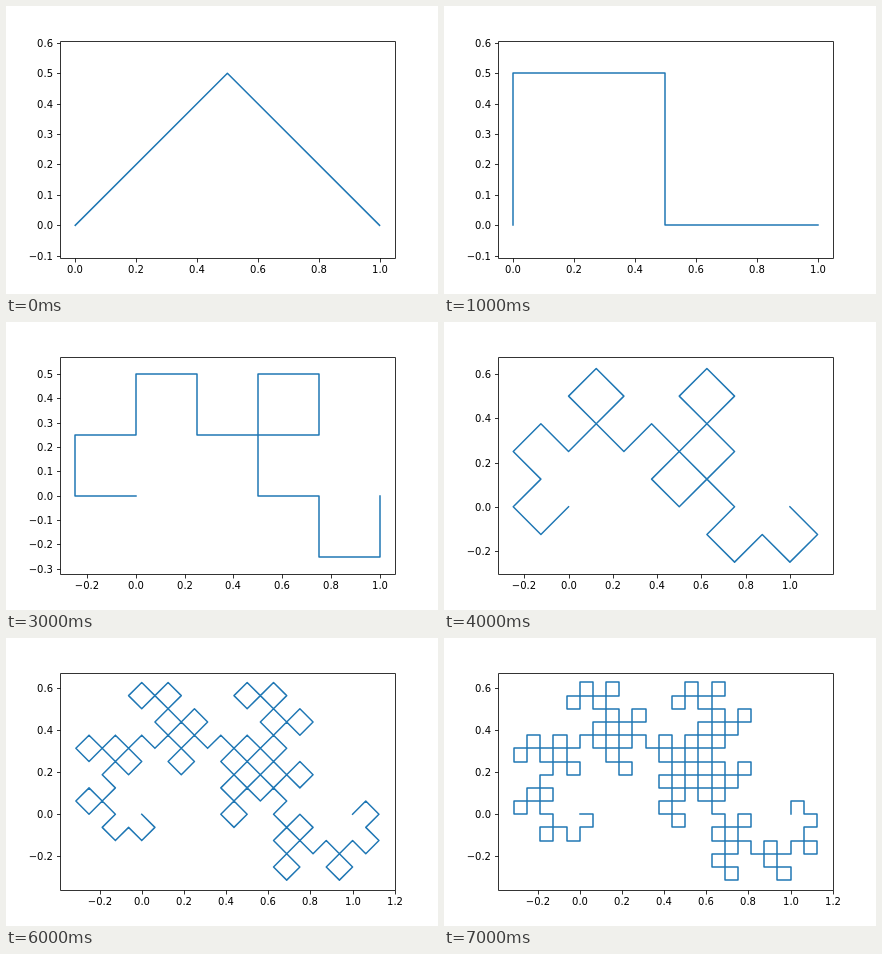
Animation of 432 by 288 pixels, one loop 8 s. Source, as an HTML page:

```html
<!DOCTYPE html>
<html lang="en">
<head>
<meta charset="utf-8">
<title>Dragon curve</title>
<style>
  html, body { margin: 0; width: 100%; height: 100%; overflow: hidden; background: #fff; }
  svg { display: block; }
  path { fill: none; stroke: #000; stroke-width: .8; }
  #curve { stroke: #1f77b4; stroke-width: 1.5; stroke-linecap: square; stroke-linejoin: round; }
  text { font: 10px "DejaVu Sans", sans-serif; }
  .x { text-anchor: middle; }
  .y { text-anchor: end; }
</style>
</head>
<body>
<svg width="432" height="288" viewBox="0 0 432 288">
  <path id="curve"/>
  <path id="axes"/>
  <g id="labels"></g>
</svg>
<script>
const LEVELS = 8, STEP_MS = 1000;
const box = { left: 54, top: 34.56, width: 334.8, height: 217.44 };
const [curve, axes, labels] = ['curve', 'axes', 'labels'].map(id => document.getElementById(id));

// Replace every segment by two, with the corner alternately on its left and right.
function fold(points) {
  const result = [points[0]];
  for (let i = 1; i < points.length; i++) {
    const [x0, y0] = points[i - 1], [x1, y1] = points[i];
    const side = i % 2 ? 1 : -1;
    result.push([(x0 + x1 - side * (y1 - y0)) / 2, (y0 + y1 + side * (x1 - x0)) / 2], [x1, y1]);
  }
  return result;
}

function extent(values) {
  const min = Math.min(...values), max = Math.max(...values);
  return { mid: (min + max) / 2, size: (max - min) * 1.1 };
}

function ticks(mid, span, step) {
  const list = [];
  for (let k = Math.ceil((mid - span / 2) / step); k * step <= mid + span / 2; k++) list.push(k * step);
  return list;
}

function draw(level) {
  let points = [[0, 0], [1, 0]];
  for (let i = 0; i < level; i++) points = fold(points);

  // Equal scale on both axes, data centred in the box.
  const ex = extent(points.map(p => p[0])), ey = extent(points.map(p => p[1]));
  const scale = Math.min(box.width / ex.size, box.height / ey.size);
  const toX = x => box.left + box.width / 2 + (x - ex.mid) * scale;
  const toY = y => box.top + box.height / 2 - (y - ey.mid) * scale;

  // Curves made of upright segments sit on whole pixels.
  const snap = level % 2 ? v => v : Math.round;
  curve.setAttribute('d', 'M' + points.map(([x, y]) => [snap(toX(x)), snap(toY(y))]).join('L'));

  let lines = 'M54.5 35.5H389.5V252.5H54.5Z', text = '';
  const label = (cls, x, y, value) => {
    text += `<text class="${cls}" x="${x}" y="${y}">${value.toFixed(1).replace('-', '\u2212')}</text>`;
  };
  for (const v of ticks(ex.mid, box.width / scale, .2)) {
    const x = Math.round(toX(v));
    lines += `M${x + .5} 252.5v4`;
    label('x', x, 267, v);
  }
  for (const v of ticks(ey.mid, box.height / scale, level < 5 ? .1 : .2)) {
    const y = Math.round(toY(v));
    lines += `M54.5 ${y + .5}h-3.5`;
    label('y', 47, y + 4, v);
  }
  axes.setAttribute('d', lines);
  labels.innerHTML = text;
}

let shown = 0;
function tick() {
  const level = Math.floor(performance.now() / STEP_MS) % LEVELS + 1;
  if (level !== shown) draw(shown = level);
  requestAnimationFrame(tick);
}
tick();
</script>
</body>
</html>
```
